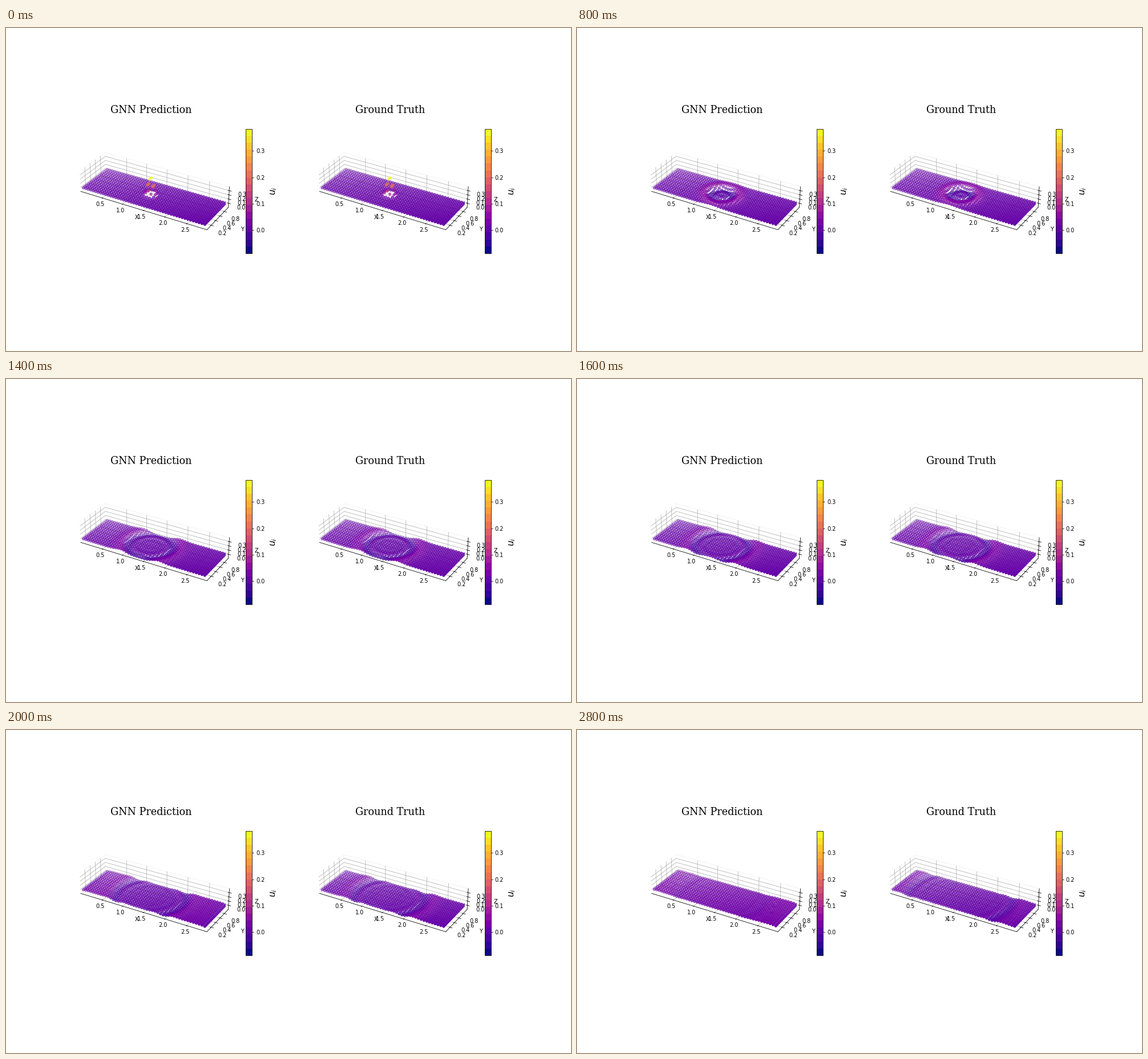
Recreate the animation shown at these times as a matplotlib script. Size 990 by 566 pixels, loop 3 s.

```python
import numpy as np
import matplotlib.pyplot as plt
from matplotlib.animation import FuncAnimation
from matplotlib.cm import ScalarMappable
from matplotlib.colors import Normalize

FRAMES, INTERVAL = 15, 200
DPI = 990 / 14
U_MIN, U_MAX = -0.087, 0.383
STEP = 0.0625
NX, NY = 47, 16
X0, Y0 = 0.01, STEP / 2
CENTER = (X0 + 22 * STEP, 0.5)
SIGMA, AMP = 0.06, 0.44
SPEED = 0.0935          # wave travel per frame
DAMPING = 9e-5          # smoothing of short waves per frame
STALL = 12              # frame at which the predicted wave stops advancing

plt.rcParams["font.family"] = "DejaVu Sans"

# Node grid
xs = X0 + STEP * np.arange(NX)
ys = Y0 + STEP * np.arange(NY)
X, Y = (a.ravel() for a in np.meshgrid(xs, ys))
R = np.hypot(X - CENTER[0], Y - CENTER[1])
EDGE = np.minimum(X - xs[0], xs[-1] - X)
NOISE = np.random.default_rng(4).normal(size=R.size)

# Hankel transform of a Gaussian pulse on a dispersive, damped lattice
radii = np.linspace(0, R.max() + 0.01, 250)
k = np.linspace(0, np.pi / STEP, 240)
theta = (np.arange(90) + 0.5) * np.pi / 180
bessel = np.array([np.cos(np.outer(k * r, np.cos(theta))).mean(axis=1)
                   for r in radii])
spectrum = AMP * SIGMA**2 * k * np.exp(-(k * SIGMA) ** 2 / 2) * (k[1] - k[0])
omega = SPEED * 2 / STEP * np.sin(k * STEP / 2)


def truth(n):
    wave = spectrum * np.exp(-DAMPING * k**2 * n) * np.cos(omega * n)
    return np.interp(R, radii, bessel @ wave)


def predict(n):
    t = min(n, STALL)
    late = np.clip((n - STALL) / 2, 0, 1)
    front = R - SPEED * t
    ahead = 1 / (1 + np.exp(-(front - 0.15) / 0.05))
    hump = 0.045 * np.clip((n - 9) / 3, 0, 1) * ahead * (1 - np.exp(-EDGE / 0.08))
    rough = 0.012 * (1 + 0.5 * NOISE * np.exp(-(front / 0.08) ** 2))
    return (1 - 0.7 * late) * (truth(t) + hump) + late * rough


def padded(lo, hi):
    pad = (hi - lo) / 48
    return lo - pad, hi + pad


LIMITS = [padded(xs[0], xs[-1]), padded(ys[0], ys[-1]), padded(U_MIN, U_MAX)]
norm = Normalize(U_MIN, U_MAX)

fig = plt.figure(figsize=(990.001 / DPI, 566.001 / DPI), dpi=DPI, facecolor="white")


def make_panel(slot, title):
    ax = fig.add_subplot(1, 2, slot, projection="3d")
    ax.view_init(elev=30, azim=-60)
    ax.set_xticks(np.arange(0.5, 2.6, 0.5))
    ax.set_yticks([0.2, 0.4, 0.6, 0.8])
    ax.set_zticks([0.0, 0.1, 0.2, 0.3])
    ax.set_xlim(*LIMITS[0])
    ax.set_ylim(*LIMITS[1])
    ax.set_zlim(*LIMITS[2])
    ax.set_box_aspect([hi - lo for lo, hi in LIMITS])
    for axis, name in zip((ax.xaxis, ax.yaxis, ax.zaxis), "XYZ"):
        axis.pane.fill = False
        axis.set_label_text(name)
    ax.set_title(title, fontsize=18, fontfamily="DejaVu Serif")
    return ax


def add_colorbar(ax):
    bands = ScalarMappable(norm, plt.get_cmap("plasma").resampled(18))
    bar = fig.colorbar(bands, ax=ax, shrink=0.5, pad=0.1)
    bar.set_label("$u_i$", labelpad=8, fontsize=16)


panels = [(make_panel(1, "GNN Prediction"), predict),
          (make_panel(2, "Ground Truth"), truth)]
for ax, _ in panels:
    add_colorbar(ax)

clouds = []


def update(n):
    while clouds:
        clouds.pop().remove()
    for ax, field in panels:
        u = field(n)
        clouds.append(ax.scatter(X, Y, u, c=u, cmap="plasma", norm=norm))
    return clouds


anim = FuncAnimation(fig, update, frames=FRAMES, interval=INTERVAL,
                     repeat=True, repeat_delay=0, blit=False)
plt.show()
```
